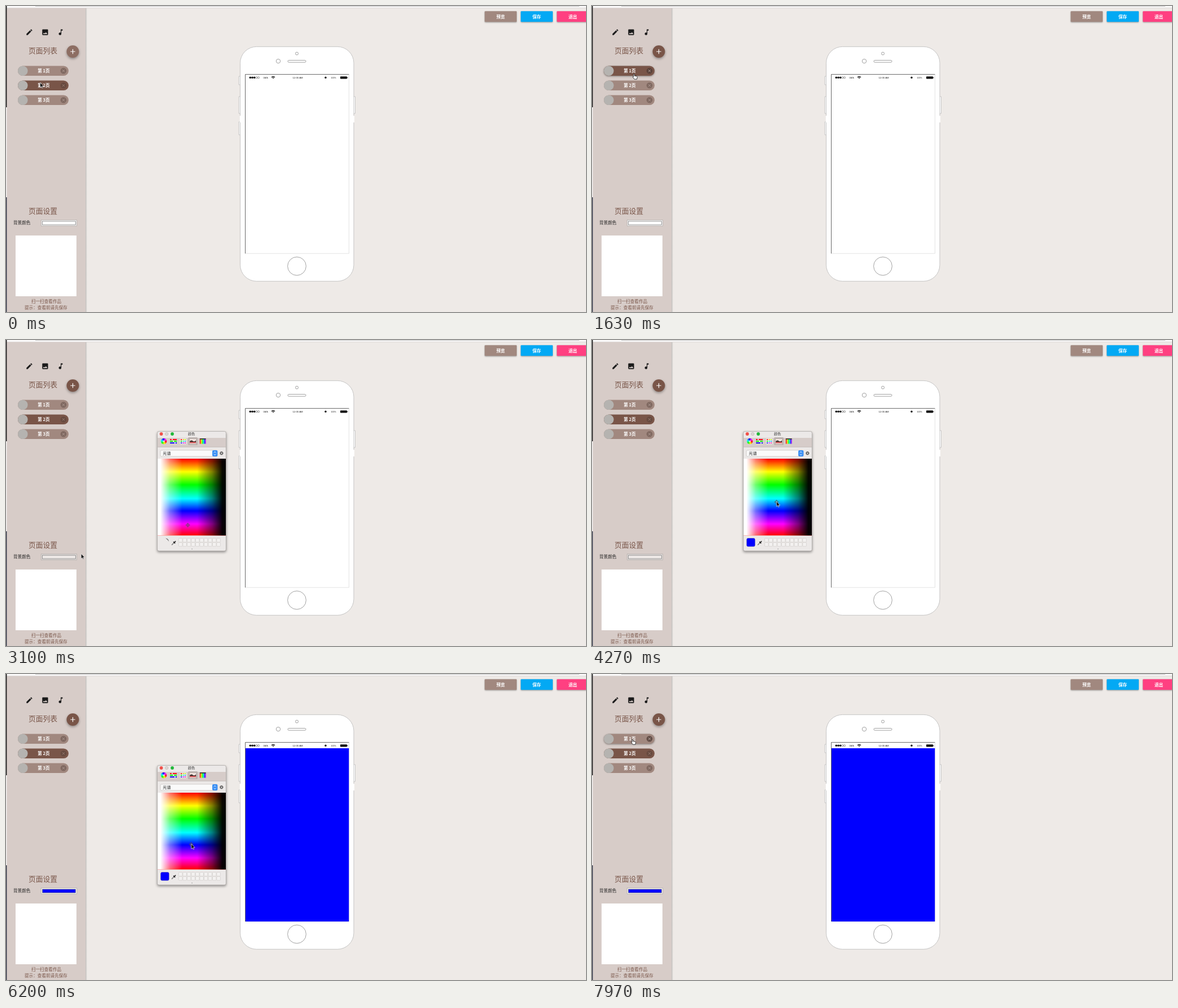
Recreate the animation shown at these times as an HTML page. Size 1029x544 px, loop 8000 ms.

```html
<!DOCTYPE html>
<html lang="zh">
<head>
<meta charset="utf-8">
<title>H5 页面编辑器</title>
<style>
html, body { margin: 0; width: 100%; height: 100%; overflow: hidden; background: #eeeae7; }
svg { display: block; width: 1029px; height: 544px; }
text { font-family: "Noto Sans CJK SC", "Noto Sans CJK", "Noto Sans", sans-serif; font-size: 7.6px; text-anchor: middle; }
.start { text-anchor: start; }
.brown { fill: #795548; }
.head { font-size: 12.8px; }
.bold { font-weight: 700; fill: #fff; }
.tiny { font-family: "Liberation Sans", Arial, sans-serif; font-size: 4.3px; fill: #222; }
.lift { filter: drop-shadow(0 1px 1px rgba(0, 0, 0, .35)); }
.line { fill: none; stroke: #8a8a8a; stroke-width: .8; }
.chip.hover { filter: drop-shadow(0 1.5px 1.5px rgba(0, 0, 0, .4)); }
.chip .close { opacity: .4; }
.chip.hover .close { opacity: .75; }
.chip .pill { fill: #a1887f; }
.chip.on .pill { fill: #795548; }
</style>
</head>
<body>
<svg viewBox="0 0 1029 544">
  <defs>
    <linearGradient id="hue" x2="0" y2="1">
      <stop stop-color="#f00"/><stop offset=".17" stop-color="#ff0"/>
      <stop offset=".34" stop-color="#0f0"/><stop offset=".52" stop-color="#0ff"/>
      <stop offset=".68" stop-color="#00f"/><stop offset=".85" stop-color="#f0f"/>
      <stop offset="1" stop-color="#f00"/>
    </linearGradient>
    <linearGradient id="tint">
      <stop offset=".04" stop-color="#fff"/><stop offset=".18" stop-color="#fff" stop-opacity=".42"/>
      <stop offset=".36" stop-color="#fff" stop-opacity="0"/>
    </linearGradient>
    <linearGradient id="shade">
      <stop offset=".58" stop-opacity="0"/><stop offset=".8" stop-opacity=".5"/>
      <stop offset=".95" stop-opacity=".97"/>
    </linearGradient>
    <linearGradient id="edge">
      <stop stop-opacity=".2"/><stop offset="1" stop-opacity="0"/>
    </linearGradient>
  </defs>

  <!-- window edges -->
  <rect width="1029" height="544" fill="#eeeae7"/>
  <rect width="1029" height="3.5" fill="#faf9f9"/>
  <rect x="52" width="965" height="1" fill="#c4c4c4"/>
  <rect y="3" width="1029" height="1" fill="#dedad8"/>
  <rect x="141" y="4" width="3" height="540" fill="url(#edge)"/>
  <rect x="1" y="4" width="140" height="540" fill="#d7ccc8"/>
  <rect width="1.4" height="544" fill="#f4f2f2"/>
  <rect width="1.4" height="180" fill="#111"/>
  <rect y="340" width="1.4" height="204" fill="#2b3040"/>

  <!-- sidebar -->
  <g fill="#1a1a1a">
    <path transform="translate(34.6 39.7) scale(.57)" d="M3 17.25V21h3.75L17.81 9.94l-3.75-3.75zM20.71 7.04a1 1 0 0 0 0-1.41l-2.34-2.34a1 1 0 0 0-1.41 0l-1.83 1.83 3.75 3.75z"/>
    <path transform="translate(62.6 39.7) scale(.57)" d="M21 19V5a2 2 0 0 0-2-2H5a2 2 0 0 0-2 2v14a2 2 0 0 0 2 2h14a2 2 0 0 0 2-2zM8.5 13.5l2.5 3L14.5 12l4.5 6H5z"/>
    <path transform="translate(90.2 39.7) scale(.57)" d="M12 3v10.55a4 4 0 1 0 2 3.45V7h4V3z"/>
  </g>
  <text class="brown head" x="65.5" y="83.6">页面列表</text>
  <g style="filter:drop-shadow(0 2px 2px rgba(0,0,0,.35))">
    <circle id="add" cx="118.5" cy="81" r="11"/>
  </g>
  <path d="M114.3 81h8.4M118.5 76.8v8.4" stroke="#fff" stroke-width="1.2"/>
  <g id="chips"></g>
  <text class="brown head" x="65.5" y="368.7">页面设置</text>
  <text class="start" x="13" y="387.8" fill="#222">背景颜色</text>
  <rect id="field" x="62.5" y="380.5" width="63" height="10.5" stroke="#b0aba9" stroke-width=".8"/>
  <rect id="value" x="64.5" y="382.7" width="59" height="6.3" stroke="#777" stroke-width=".8"/>
  <rect x="17" y="408" width="108" height="108" fill="#fff"/>
  <text class="brown" x="71.5" y="527.6">扫一扫查看作品</text>
  <text class="brown" x="71" y="538.6">提示：查看前请先保存</text>

  <!-- top buttons -->
  <g id="buttons"></g>

  <!-- phone -->
  <g fill="#fff" stroke="#b9b9b9" stroke-width=".8">
    <path d="M415.5 125h-2.3v15h2.3M415.5 161h-2.3v30h2.3M415.5 206h-2.3v23h2.3M617 161h2.5v30H617"/>
    <rect x="415.5" y="72.3" width="201.5" height="417" rx="29"/>
  </g>
  <rect x="414.8" y="195" width="2" height="12" fill="#fff"/>
  <rect x="616" y="195" width="2" height="12" fill="#fff"/>
  <g class="line">
    <circle cx="516" cy="84.5" r="2.5"/>
    <circle cx="483" cy="98" r="3.7"/>
    <rect x="500" y="96.5" width="32" height="3.6" rx="1.8"/>
    <circle cx="516" cy="462.5" r="16.4"/>
  </g>
  <path d="M608.5 122v318H424.5" fill="none" stroke="#dcdcdc" stroke-width=".8"/>
  <rect id="page" x="425" y="132" width="183.3" height="308" fill="#00f"/>
  <path d="M424.5 440V121.6H608.5" fill="none" stroke="#555" stroke-width=".9"/>
  <g fill="#111">
    <circle cx="433.3" cy="127.3" r="1.8"/><circle cx="437" cy="127.3" r="1.8"/><circle cx="440.7" cy="127.3" r="1.8"/>
    <path d="M470.5 126.2q3.5-2.4 7 0l-1.2 1q-2.3-1.4-4.6 0zM472.6 127.8q1.4-.8 2.8 0l-1.4 1.6z"/>
    <circle cx="567" cy="127.3" r="1.7"/>
    <rect x="593" y="125.2" width="12" height="4.4" rx=".8"/><rect x="605.4" y="126.4" width="1" height="2"/>
  </g>
  <g fill="none" stroke="#333" stroke-width=".5"><circle cx="444.4" cy="127.3" r="1.6"/><circle cx="448" cy="127.3" r="1.6"/></g>
  <text class="tiny" x="460.5" y="128.6" style="font-size:3.2px">DATA</text>
  <text class="tiny" x="517.5" y="128.8">12:00 AM</text>
  <text class="tiny" x="581" y="128.7" style="font-size:3.6px">100%</text>

  <!-- colour picker -->
  <g id="picker">
    <rect x="268.4" y="162.4" width="122" height="212.6" rx="3" fill="#ece9e8" stroke="#aaa5a3" stroke-width=".8" style="filter:drop-shadow(0 2px 2px rgba(0,0,0,.4))"/>
    <path d="M269 174h121v16.3H269z" fill="#d6ccc9"/>
    <path d="M269 190.3h121" stroke="#b9b2af" stroke-width=".7"/>
    <circle cx="275.5" cy="167" r="2.9" fill="#f0504a"/>
    <circle cx="285" cy="167" r="2.7" fill="#dcd6d4" stroke="#bbb4b1" stroke-width=".6"/>
    <circle cx="295" cy="167" r="2.9" fill="#22b83a"/>
    <text x="329" y="169.3" style="font-size:6.2px" fill="#333">颜色</text>
    <rect x="323" y="173" width="17" height="14" rx="1.5" fill="#bdb3b0"/>
    <g id="wheel" transform="translate(280 180)"></g>
    <g id="tools"></g>
    <path d="M326 176.2h11v8.4h-11z" fill="#f6e9e4"/>
    <path d="M326 180q3-2.5 5.5-.6t5.5-.6v2.6h-11z" fill="#332624"/>
    <path d="M326 181.4h11v2h-11z" fill="#d0484a"/>
    <rect x="274" y="196" width="101" height="11" rx="2" fill="#fafafa" stroke="#c4bfbd" stroke-width=".7"/>
    <rect x="366" y="196" width="9.3" height="11" rx="2" fill="#3a8ff4"/>
    <path d="M368.8 200.4l1.8-2 1.8 2M368.8 202.8l1.8 2 1.8-2" fill="none" stroke="#fff" stroke-width=".9"/>
    <text class="start" x="278" y="204.2" style="font-size:7.2px" fill="#222">光谱</text>
    <circle cx="382.3" cy="201.3" r="1.9" fill="none" stroke="#444" stroke-width="1.2"/>
    <circle cx="382.3" cy="201.3" r="2.9" fill="none" stroke="#444" stroke-width=".9" stroke-dasharray="1.14"/>
    <g id="spectrum"></g>
    <g id="mark" fill="none" stroke="#555" stroke-width=".7"><circle r="2.6"/><path d="M-4 0h8M0-4v8"/></g>
    <path id="arc" d="M283 352.6q5.2.4 5.8 5.6-1.6-3.4-5.8-5.6z" fill="#555"/>
    <rect id="swatch" x="274.5" y="352.5" width="14.6" height="14.6" rx="2.4" fill="#00f" stroke="#3a36b4" stroke-width=".6"/>
    <path d="M294 364.6l4.4-4.6" stroke="#777" stroke-width="1.4"/>
    <path d="M297 358.6l3 3M298.6 360l2.4-2.4" stroke="#222" stroke-width="1.6"/>
    <g id="cells" fill="#f3f1f0" stroke="#d2cdcb" stroke-width=".7"></g>
    <circle cx="330" cy="371.5" r=".8" fill="#999"/>
  </g>

  <!-- pointer -->
  <g id="pointer" stroke-linejoin="round">
    <path id="arrow" d="M0 0V9L2.1 7 3.4 10 4.8 9.4 3.5 6.5H6.3Z" fill="#111" stroke="#fff" stroke-width=".6"/>
    <path id="hand" transform="translate(-2.4 -.6)" d="M2.4 .6Q3.4.6 3.4 1.8V4L7 4.6Q8.4 5 8.2 6.5L7.4 10H3.2L.4 6.4Q0 5.4 1 5.3L1.6 5.9V1.8Q1.6.6 2.4.6Z" fill="#fff" stroke="#111" stroke-width=".8"/>
  </g>
</svg>
<script>
const $ = id => document.getElementById(id);
const LOOP = 8000;

$('chips').innerHTML = [1, 2, 3].map((n, i) => `
  <g class="chip" transform="translate(0 ${115.3 + i * 26})">
    <rect class="pill" x="21" y="-8.8" width="90" height="17.6" rx="8.8"/>
    <circle cx="29.8" r="8.8" fill="#b5b3b0"/>
    <text class="bold" x="67" y="2.8">第 ${n}页</text>
    <g class="close"><circle cx="102" r="5.3" fill="#4e3a33"/>
      <path d="M99.8-2.2l4.4 4.4m0-4.4l-4.4 4.4" stroke="#d7ccc8" stroke-width=".8"/></g>
  </g>`).join('');

$('buttons').innerHTML = [['预览', '#a1887f'], ['保存', '#03a9f4'], ['退出', '#ff4081']].map(([label, fill], i) => `
  <g transform="translate(${849.3 + i * 64} 9.3)">
    <rect class="lift" width="56.7" height="19" rx="1" fill="${fill}"/>
    <text class="bold" x="28.3" y="12.4">${label}</text>
  </g>`).join('');

const box = (x, y, w, h, fill) => `<rect x="${x}" y="${y}" width="${w}" height="${h}" fill="${fill}"/>`;
const hsl = h => `hsl(${h},95%,52%)`;
const range = (n, fn) => Array.from({ length: n }, (_, i) => fn(i)).join('');

$('spectrum').innerHTML = ['hue', 'tint', 'shade'].map(id => box(269, 211, 121, 136.5, `url(#${id})`)).join('');
$('wheel').innerHTML = range(12, i =>
  `<circle r="2.6" pathLength="12" fill="none" stroke="${hsl(i * 30)}" stroke-width="5.2" stroke-dasharray="1.05 10.95" stroke-dashoffset="${-i}"/>`)
  + '<circle r="1.6" fill="#fff" opacity=".7"/>';
$('tools').innerHTML =
  range(3, i => box(291, 176 + i * 3, 12, 2, hsl(i * 120)) + box(294 + i * 2.5, 175.6 + i * 3, 1.5, 2.8, '#fff'))
  + box(309, 175, 11, 10, '#f4f1f0')
  + range(9, i => box(310 + i % 3 * 3.4, 176 + (i / 3 | 0) * 3, 2, 2, hsl(i * 40)))
  + range(6, i => box(343.8 + i * 1.8, 176, 1.8, 8.5, hsl(i * 55)))
  + box(343.8, 175, 10.8, 1.6, '#333');
$('cells').innerHTML = range(20, i =>
  `<rect x="${306.3 + i % 10 * 7.5}" y="${352.5 + (i / 10 | 0) * 7.5}" width="6.6" height="6.8" rx="1"/>`);

// Pointer moves: first step, last step, number of steps, end point.
const moves = [
  [150, 150, 1, 63, 144],
  [450, 1330, 7, 73.8, 117],
  [1630, 2070, 4, 78.3, 141.3],
  [2217, 2650, 4, 100, 384],
  [2800, 3100, 3, 133.3, 380],
  [3247, 3840, 5, 326, 272],
  [3980, 4420, 4, 328.8, 302],
  [7090, 7970, 7, 71.8, 116]
];

function pointerAt(t) {
  let x = 60.5, y = 136;
  for (const [from, to, n, ex, ey] of moves) {
    if (t < from) break;
    const gap = (to - from) / (n - 1) || 1;
    const k = Math.min(1, (Math.floor((t - from + 2) / gap) + 1) / n);
    const e = k * k * (3 - 2 * k);
    x += (ex - x) * e;
    y += (ey - y) * e;
  }
  return [x, y];
}

const show = (id, on) => $(id).setAttribute('visibility', on ? 'inherit' : 'hidden');
const fill = (id, color) => $(id).setAttribute('fill', color);
const chips = [...document.querySelectorAll('.chip')];

function draw(t) {
  const [x, y] = pointerAt(t);
  const active = t >= 1480 && t < 1920 ? 0 : 1;
  let over = -1;
  chips.forEach((chip, i) => {
    const hit = t >= 150 && x > 21 && x < 111 && Math.abs(y - 115.3 - i * 26) < 9;
    if (hit) over = i;
    chip.classList.toggle('hover', hit);
    chip.classList.toggle('on', i === active);
  });
  $('pointer').setAttribute('transform', `translate(${x} ${y})`);
  show('arrow', over < 0);
  show('hand', over >= 0);

  const picked = t >= 3980, applied = t >= 6200, open = t >= 2800 && t < 7090;
  fill('add', t < 150 ? '#8d6e63' : '#795548');
  fill('field', t >= 2800 && !applied ? '#ece7e5' : '#fff');
  fill('value', applied ? '#00f' : t >= 2800 ? '#ece7e5' : '#fff');
  show('page', applied);
  show('picker', open);
  $('picker').setAttribute('opacity', t >= 6940 ? .3 : 1);
  show('swatch', picked);
  show('arc', !picked);
  $('mark').setAttribute('transform', picked ? `translate(${x} ${y + 1})` : 'translate(322.5 329)');
}

function tick(now) {
  draw(now % LOOP);
  requestAnimationFrame(tick);
}
draw(0);
requestAnimationFrame(tick);
</script>
</body>
</html>
```
